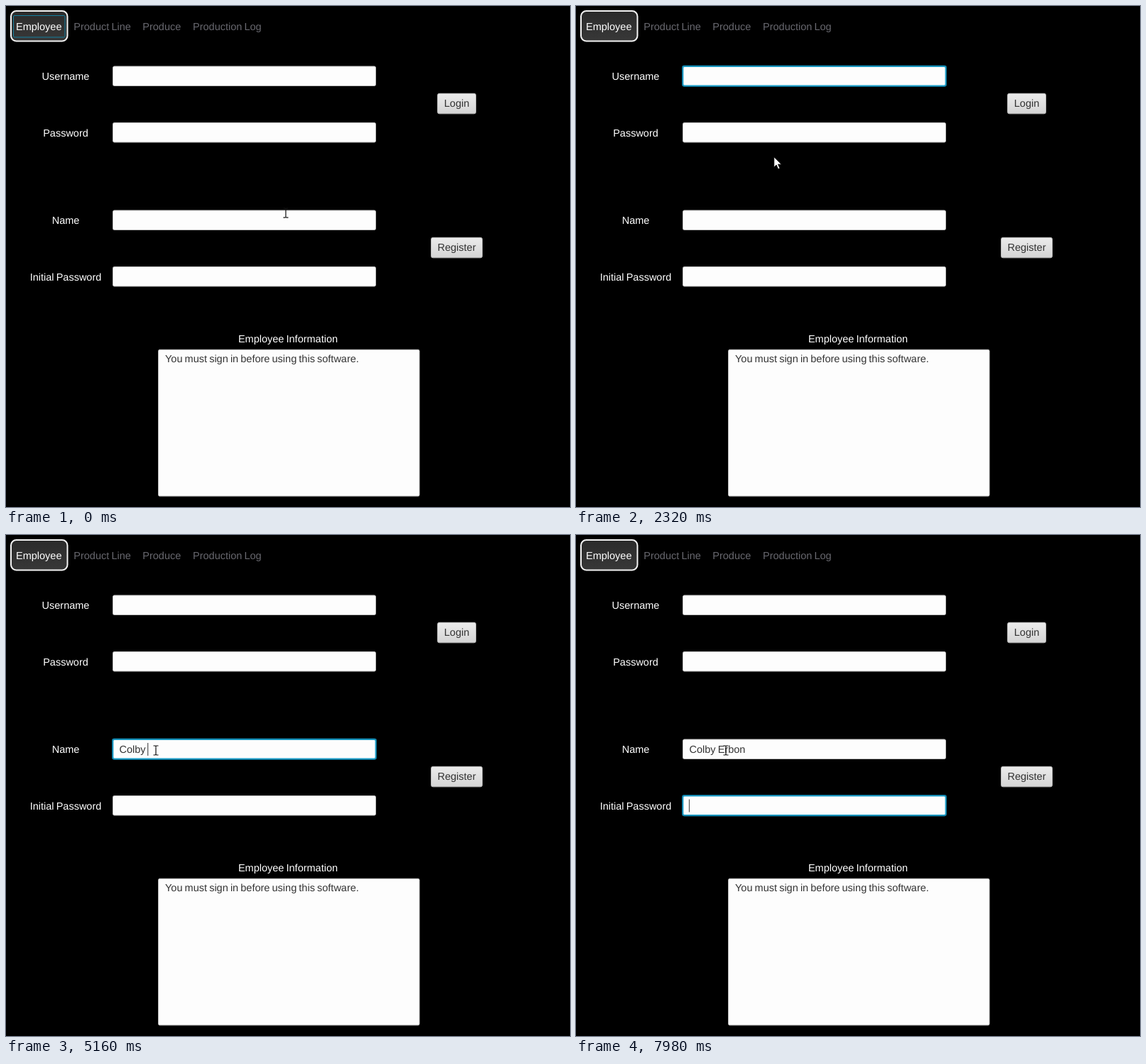
These frames come from a looping animation (794 by 706 pixels, 8000 ms). An HTML page:

```html
<!DOCTYPE html>
<html lang="en">
<head>
<meta charset="utf-8">
<title>Employee form</title>
<style>
  html, body { margin: 0; width: 100%; height: 100%; overflow: hidden; background: #000; }
  svg { display: block; width: 794px; height: 706px; }
  text {
    font: 14.5px "Liberation Sans", Arial, sans-serif;
    word-spacing: -.9px; white-space: pre;
    text-rendering: geometricPrecision;
  }
</style>
</head>
<body>
<svg id="stage" viewBox="0 0 794 706">
  <defs>
    <linearGradient id="face" x2="0" y2="1">
      <stop stop-color="#ececec"/><stop offset="1" stop-color="#d4d4d4"/>
    </linearGradient>
    <linearGradient id="tab" x2="0" y2="1">
      <stop stop-color="#2b2b2b"/><stop offset="1" stop-color="#383838"/>
    </linearGradient>
  </defs>
</svg>
<script>
const LOOP = 8000, BLINK = 500, TEXT_X = 159.5;
const NAME = 'Colby Erbon';
const KEY_TIMES = [4480, 4620, 4720, 4800, 4920, 5020, 5560, 5740, 5900, 6040, 6180];

// Focus changes: time and field index (-1 is the tab)
const FOCUS = [[0, -1], [740, 0], [3620, 2], [6900, 3]];
const FIELD_Y = [85, 164.5, 288, 367.5];

// Pointer path: time, x, y
const PATH = [[0, 394, 292], [600, 334, 100], [1200, 333, 103], [1520, 334, 144],
  [3000, 232, 271], [3400, 211, 303.5], [LOOP, 211, 303.5]];

const stage = document.getElementById('stage');

function add(tag, attrs, parent = stage) {
  const el = document.createElementNS('http://www.w3.org/2000/svg', tag);
  for (const k in attrs) el.setAttribute(k, attrs[k]);
  parent.appendChild(el);
  return el;
}

const rect = (x, y, width, height, rx, attrs) => add('rect', { x, y, width, height, rx, ...attrs });

function label(str, x, y, fill = '#fff', anchor = 'middle') {
  const el = add('text', { x, y, fill, 'text-anchor': anchor });
  el.textContent = str;
  return el;
}

const show = (el, on) => el.setAttribute('visibility', on ? 'visible' : 'hidden');

// Tabs
rect(7, 7, 79.5, 42.5, 7.5, { fill: 'url(#tab)', stroke: '#f4f4f4', 'stroke-width': 2 });
const tabRing = rect(10.5, 13.5, 72.5, 30.5, 1.5, { fill: 'none', stroke: '#137f9f' });
label('Employee', 14, 34, '#fff', 'start');
label('Product Line', 95.3, 34, '#68686f', 'start');
label('Produce', 192.3, 34, '#68686f', 'start');
label('Production Log', 263, 34, '#68686f', 'start');

// Fields
const rings = FIELD_Y.map((y, i) => {
  label(['Username', 'Password', 'Name', 'Initial Password'][i], 84, y + 19);
  rect(150.5, y, 370, 27.5, 2, { fill: '#fdfdfd', stroke: '#bebebe', 'stroke-width': 1 });
  const ring = add('g', {});
  const glow = rect(149.8, y - .6, 371.4, 28.7, 2.5, { fill: 'none', stroke: '#0b6f92', 'stroke-width': 1.6 });
  const line = rect(150.7, y + .3, 369.6, 27, 2, { fill: 'none', stroke: '#1d9fca', 'stroke-width': 1.4 });
  ring.append(glow, line);
  return ring;
});

// Buttons
function button(str, x, y, w) {
  rect(x, y, w, 28.5, 2.5, { fill: 'url(#face)', stroke: '#b4b4b4' });
  label(str, x + w / 2, y + 19, '#333');
}
button('Login', 607.5, 123.3, 54);
button('Register', 598.5, 326.3, 72);

// Information box
label('Employee Information', 397, 474);
rect(214.5, 484.3, 367.5, 206.5, 2, { fill: '#fdfdfd', stroke: '#bebebe' });
label('You must sign in before using this software.', 224, 502, '#333', 'start');

const nameText = label('', TEXT_X, 307, '#333', 'start');
const caret = add('rect', { width: 1.2, height: 18, fill: '#555' });

// Pointers, drawn around their hot spots
const arrow = add('path', {
  d: 'M0 0V14.4L3.3 11.3L5.8 17L8.2 16L5.7 10.4H10.4Z',
  fill: '#fff', stroke: '#000', 'stroke-width': .8
});
const beam = add('path', {
  d: 'M-3.5 -6.5H-1L0 -5.7L1 -6.5H3.5M0 -5.7V5.7M-3.5 6.5H-1L0 5.7L1 6.5H3.5',
  fill: 'none', stroke: '#111', 'stroke-width': 1.2
});

function pointerAt(t) {
  const i = PATH.findIndex(p => p[0] > t);
  const [t0, x0, y0] = PATH[i - 1], [t1, x1, y1] = PATH[i];
  const k = (t - t0) / (t1 - t0);
  return [x0 + (x1 - x0) * k, y0 + (y1 - y0) * k];
}

function draw(t) {
  const [since, focus] = FOCUS.filter(f => f[0] <= t).pop();
  show(tabRing, focus < 0);
  rings.forEach((r, i) => show(r, i === focus));

  const typed = KEY_TIMES.filter(k => k <= t).length;
  nameText.textContent = NAME.slice(0, typed);

  // Typing restarts the blink
  const last = Math.max(since, typed ? KEY_TIMES[typed - 1] : 0);
  show(caret, focus >= 0 && Math.floor((t - last) / BLINK) % 2 === 0);
  if (focus >= 0) {
    const shift = focus === 2 && typed ? nameText.getComputedTextLength() : 0;
    caret.setAttribute('x', TEXT_X - .6 + shift);
    caret.setAttribute('y', FIELD_Y[focus] + 5);
  }

  const [x, y] = pointerAt(t);
  const overField = x > 150 && x < 521 && FIELD_Y.some(f => y >= f && y <= f + 28);
  for (const el of [arrow, beam]) el.setAttribute('transform', `translate(${x} ${y})`);
  show(beam, overField);
  show(arrow, !overField);
}

const start = performance.now();
function tick() {
  draw((performance.now() - start) % LOOP);
  requestAnimationFrame(tick);
}
tick();
</script>
</body>
</html>
```
